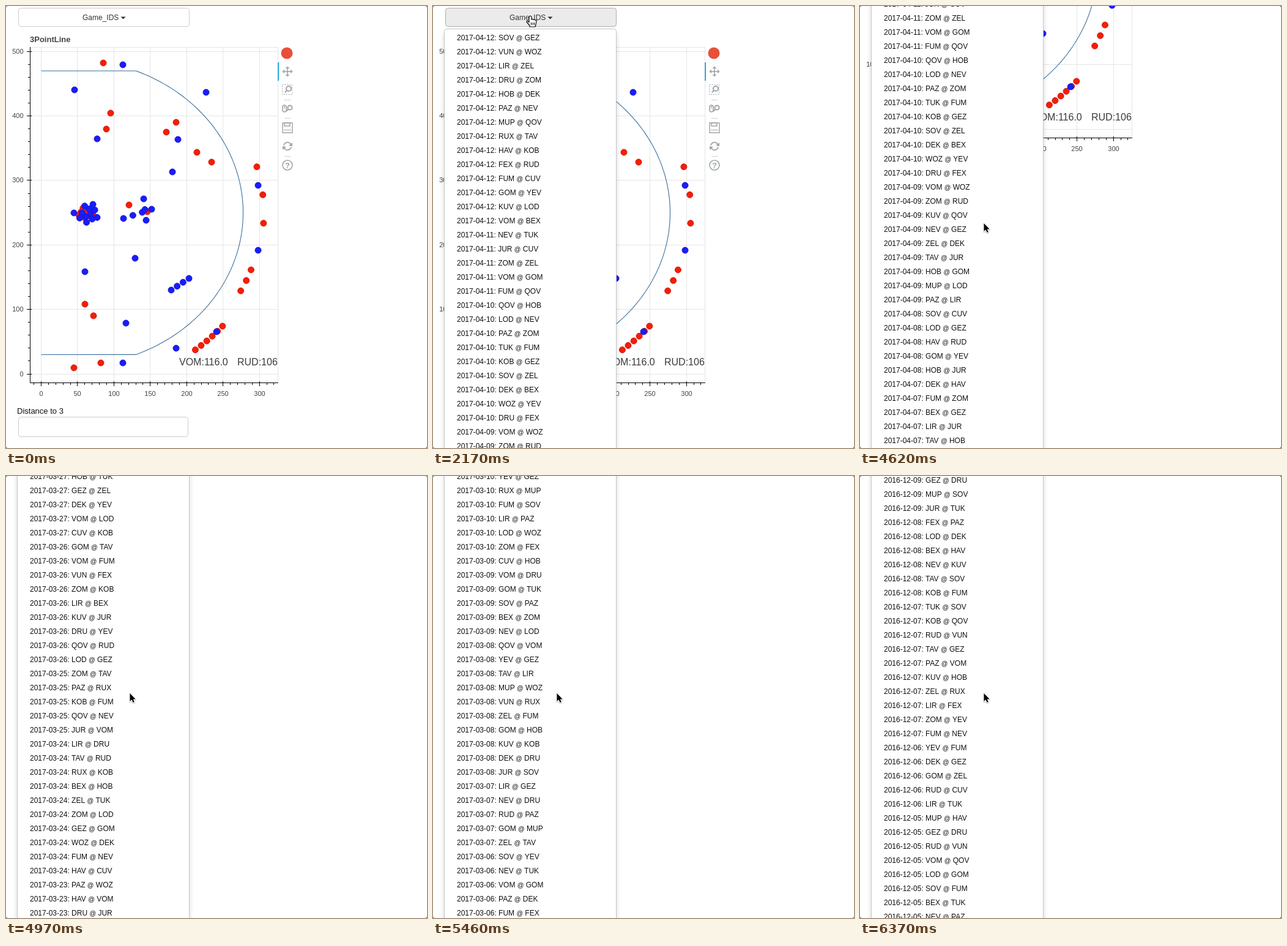
An HTML page with a canvas for the animation above (6.44 s loop, 688 by 722 pixels).

```html
<!DOCTYPE html>
<html lang="en">
<head>
<meta charset="utf-8">
<title>Shot chart</title>
<style>
  html, body { margin: 0; width: 100%; height: 100%; overflow: hidden; background: #fff; }
  canvas { display: block; }
</style>
</head>
<body>
<canvas id="stage" width="688" height="722"></canvas>
<script>
const W = 688, H = 722, LOOP = 6440, STEP = 70, ROW = 23, FIRST_ROW = 52;
const SANS = '"Liberation Sans", Arial, sans-serif';
const INK = '#333', ICON = '#a1a6a9';
const ctx = document.getElementById('stage').getContext('2d');

// ---- Game list ----
const TEAMS = ('VOM RUD ZEL TAV KOB DRU FEX GOM HAV JUR LOD MUP NEV PAZ QOV RUX SOV TUK ' +
  'VUN WOZ YEV BEX CUV DEK FUM GEZ HOB KUV LIR ZOM').split(' ');
const WEEK = [9, 9, 5, 10, 6, 10, 5]; // games per weekday, from Sunday
const FINAL_DAY = 14;

let seed = 20170412;
const random = () => (seed = (seed * 1664525 + 1013904223) >>> 0) / 4294967296;

function shuffled(list) {
  const a = [...list];
  for (let i = a.length - 1; i > 0; i--) {
    const j = Math.floor(random() * (i + 1));
    [a[i], a[j]] = [a[j], a[i]];
  }
  return a;
}

function buildRows() {
  const rows = [], day = new Date(Date.UTC(2017, 3, 12)), end = Date.UTC(2016, 10, 28);
  for (; day > end; day.setUTCDate(day.getUTCDate() - 1)) {
    const date = day.toISOString().slice(0, 10), teams = shuffled(TEAMS);
    const count = rows.length ? WEEK[day.getUTCDay()] : FINAL_DAY;
    for (let i = 0; i < count; i++) rows.push({ date, away: teams[2 * i], home: teams[2 * i + 1] });
  }
  return rows;
}
const rows = buildRows();
const scrollTo = (date, y) => FIRST_ROW + ROW * rows.findIndex(r => r.date === date) - y;

// ---- Motion: keys are [time, values, easing into this key] ----
const linear = u => u;
const easeIn = u => u ** 1.3;
const easeOut = u => 1 - (1 - u) ** 2;
const smooth = u => u * u * (3 - 2 * u);

function track(keys, t) {
  const next = keys.findIndex(k => k[0] > t);
  if (next < 0) return keys[keys.length - 1][1];
  if (next === 0) return keys[0][1];
  const [t0, a] = keys[next - 1], [t1, b, ease = linear] = keys[next];
  const u = ease((t - t0) / (t1 - t0));
  return a.map((v, i) => v + (b[i] - v) * u);
}

const SCROLL = [
  [4340, [0]],
  [4620, [400], smooth],
  [4690, [400]],
  [4970, [scrollTo('2017-03-26', 116)], easeIn],
  [5460, [scrollTo('2017-03-09', 139)], easeOut],
  [5880, [scrollTo('2017-01-14', 105)], easeIn],
  [6370, [scrollTo('2016-12-08', 76)], easeOut]
];
const POINTER = [
  [490, [186, -14]],
  [1050, [159, 16], easeOut],
  [3220, [159, 16]],
  [3570, [158, 21], smooth],
  [3850, [158, 21]],
  [3920, [160.5, 42]],
  [4340, [202.5, 355], smooth]
];
const OPEN_AT = 1890;

// ---- Drawing helpers ----
function text(s, x, y, size, color = INK, align = 'left', weight = 'normal') {
  ctx.font = `${weight} ${size}px ${SANS}`;
  ctx.textAlign = align;
  ctx.fillStyle = color;
  ctx.fillText(s, x, y);
  return x + ctx.measureText(s).width;
}

function line(color, width, ...points) {
  ctx.beginPath();
  points.forEach(([x, y]) => ctx.lineTo(x, y));
  ctx.strokeStyle = color;
  ctx.lineWidth = width;
  ctx.stroke();
}

function fillShape(color, ...points) {
  ctx.beginPath();
  points.forEach(([x, y]) => ctx.lineTo(x, y));
  ctx.fillStyle = color;
  ctx.fill();
}

function box(x, y, w, h, fill, stroke) {
  ctx.beginPath();
  ctx.roundRect(x, y, w, h, 4);
  ctx.fillStyle = fill;
  ctx.fill();
  ctx.strokeStyle = stroke;
  ctx.lineWidth = 1;
  ctx.stroke();
}

function ring(x, y, r, width = 2, from = 0, to = 7) {
  ctx.beginPath();
  ctx.arc(x, y, r, from, to);
  ctx.strokeStyle = ICON;
  ctx.lineWidth = width;
  ctx.stroke();
}

// ---- Shots ----
const ARC = { x: 104.7, y: 337.7, rx: 282.8, ry: 250.6 };
const onArc = (deg, scale = 1) => {
  const a = deg * Math.PI / 180;
  return [ARC.x + ARC.rx * scale * Math.cos(a), ARC.y + ARC.ry * scale * Math.sin(a)];
};
const alongArc = (from, to, count, scale) =>
  Array.from({ length: count }, (_, i) => onArc(from + (to - from) * i / (count - 1), scale));

// Spiral of dots around a spot, flattened vertically.
const cluster = (x, y, rx, ry, count) => Array.from({ length: count }, (_, i) => {
  const r = Math.sqrt((i + 0.5) / count), a = i * 2.4;
  return [x + rx * r * Math.cos(a), y + ry * r * Math.sin(a)];
});
const between = ([x0, y0], [x1, y1], count) => Array.from({ length: count }, (_, i) => {
  const u = i / (count - 1);
  return [x0 + (x1 - x0) * u, y0 + (y1 - y0) * u];
});

const RED = [
  [159, 93],
  ...between([171, 175], [164, 201], 2),
  ...between([278, 190], [262, 206], 2),
  ...between([312, 239], [336, 255], 2),
  ...between([129, 487], [143, 506], 2),
  ...between([155, 583], [111, 591], 2),
  ...between([201, 325], [231, 336], 2),
  ...alongArc(-15.5, 3.5, 3, 1.12),
  ...alongArc(19.6, 27.3, 3, 1.11),
  ...alongArc(40, 51, 6, 1.15),
  ...cluster(131, 338, 13, 10, 10)
];
const BLUE = [
  [191, 96], [112, 137], [327, 141], [149, 217], [281, 218], [272, 271], [412, 293], [412, 399],
  [211, 412], [129, 434], [196, 518], [344, 532], [278, 559], [191, 583], [111, 338],
  ...between([299, 445], [270, 464], 4),
  ...between([192, 347], [238, 332], 4),
  ...between([225, 315], [229, 350], 3),
  ...cluster(135, 340, 17, 18, 11)
];

function drawDots(points, fill, edge) {
  for (const [x, y] of points) {
    ctx.beginPath();
    ctx.arc(x, y, 5, 0, 7);
    ctx.fillStyle = fill;
    ctx.fill();
    ctx.strokeStyle = edge;
    ctx.lineWidth = 1;
    ctx.stroke();
  }
}

// ---- Chart ----
const crisp = v => Math.floor(v) + 0.5;
const px = v => crisp(57.5 + v * 1.189);
const py = v => crisp(601 - v * 1.0535);

function drawAxes() {
  const grid = '#e5e5e5', axis = '#000';
  for (let v = 0; v <= 300; v += 50) {
    line(grid, 1, [px(v), 67], [px(v), 615]);
    text(v, px(v), 637, 11, '#444', 'center');
  }
  for (let v = 0; v <= 500; v += 100) {
    line(grid, 1, [40, py(v)], [444, py(v)]);
    text(v, 28.5, py(v) + 3.5, 11, '#444', 'right');
  }
  ctx.strokeRect(39.5, 67.5, 405, 548);
  line(axis, 1, [39.5, 67], [39.5, 615.5], [445, 615.5]);
  for (let v = -10; v <= 320; v += 10) {
    const major = v % 50 === 0;
    line(axis, 1, [px(v), major ? 613 : 615], [px(v), major ? 621 : 619]);
  }
  for (let v = 0; v <= 500; v += 20) {
    const major = v % 100 === 0;
    line(axis, 1, [major ? 34 : 36, py(v)], [major ? 42 : 40, py(v)]);
  }
}

function drawChart() {
  text('3PointLine', 39, 59, 13, '#444', 'left', 'bold');
  drawAxes();
  ctx.save();
  ctx.beginPath();
  ctx.rect(40, 67, 404, 548);
  ctx.clip();
  line('#3a6f9c', 1.1, [57.5, 106], ...alongArc(-67.6, 67.6, 90), [57.5, 569.5]);
  drawDots(RED, '#f61d07', '#d21c0c');
  drawDots(BLUE, '#1a1cfc', '#1418cc');
  text(`${TEAMS[0]}:116.0`, 283, 587, 16, '#3a3a3a');
  text(`${TEAMS[1]}:106.0`, 378, 587, 16, '#3a3a3a');
  ctx.restore();
}

// ---- Toolbar ----
function drawMagnifier(x, y, r) {
  const d = r * 0.7;
  ring(x, y, r);
  line(ICON, 2, [x - d, y + d], [x - d - 3.5, y + d + 3.5]);
}

function drawMoveIcon(x, y) {
  ctx.save();
  ctx.translate(x, y);
  for (let i = 0; i < 4; i++) {
    line(ICON, 1.6, [0, 0], [7, 0]);
    fillShape(ICON, [8.5, 0], [5, -3.5], [5, 3.5]);
    ctx.rotate(Math.PI / 2);
  }
  ctx.restore();
}

function drawResetIcon(x, y) {
  ctx.save();
  ctx.translate(x, y);
  for (let i = 0; i < 2; i++) {
    ring(0, 0, 6.3, 1.8, -2.9, -0.4);
    fillShape(ICON, [8, -6], [8, 0], [2, -1]);
    ctx.rotate(Math.PI);
  }
  ctx.restore();
}

function drawToolbar() {
  const x = 460;
  ctx.beginPath();
  ctx.arc(459, 77, 9.5, 0, 7);
  ctx.fillStyle = '#e8503a';
  ctx.fill();
  ctx.fillStyle = '#26aae1';
  ctx.fillRect(444, 92, 2, 30);

  drawMoveIcon(x, 107);

  ctx.strokeStyle = ICON;
  ctx.lineWidth = 1;
  ctx.setLineDash([2, 2]);
  ctx.strokeRect(451.5, 128.5, 16, 16);
  ctx.setLineDash([]);
  drawMagnifier(462, 135, 4);

  ctx.beginPath();
  ctx.roundRect(452, 162, 6, 11, 3);
  ctx.lineWidth = 1.6;
  ctx.stroke();
  line(ICON, 1.4, [455, 163], [455, 167]);
  drawMagnifier(464, 166, 3.6);

  ctx.lineWidth = 1.5;
  ctx.strokeRect(452, 191, 16, 16);
  ctx.strokeRect(455, 191, 9, 5);
  line(ICON, 1, [454, 202.5], [466, 202.5]);

  drawResetIcon(x, 229);
  ring(x, 260, 8, 1.6);
  text('?', x, 264.5, 13, ICON, 'center', 'bold');
  for (const y of [153.5, 183.5, 245.5]) line('#d0d0d0', 1, [455, y], [465, y]);
}

// ---- Controls ----
function drawButton(hovered) {
  box(20.5, 3.5, 279, 30, hovered ? '#ebebeb' : '#fff', hovered ? '#adadad' : '#ccc');
  text('Game_IDS', 125, 23, 12);
  fillShape(INK, [187.5, 17.5], [195.5, 17.5], [191.5, 21.5]);
}

function drawInput() {
  text('Distance to 3', 18, 666, 13, '#111');
  box(20.5, 671.5, 277, 32, '#fff', '#ccc');
}

function drawMenu(scroll) {
  const top = Math.max(37.5, scroll - 60), height = H + 160;
  ctx.save();
  ctx.shadowColor = 'rgba(0,0,0,.175)';
  ctx.shadowBlur = 9;
  ctx.shadowOffsetY = 6;
  box(18.5, top, 281, height, '#fff', 'transparent');
  ctx.restore();
  box(18.5, top, 281, height, '#fff', '#c6c6c6');

  const first = Math.max(0, Math.floor((scroll - FIRST_ROW) / ROW) - 1);
  rows.slice(first, first + 36).forEach(({ date, away, home }, i) => {
    const y = FIRST_ROW + ROW * (first + i) + 4;
    let x = text(`${date}: ${away} `, 39, y, 12, '#111');
    x = text('@', x, y, 10.5, '#111');
    text(` ${home}`, x, y, 12, '#111');
  });
}

// ---- Pointer ----
const ARROW = new Path2D('M0 0V13L3 10.3L5.2 15L7.3 14.2L5.2 9.6H9.2Z');
const HAND = new Path2D('M-2 1.5Q0-1 2 1.5V6Q4 4.5 5 6.5Q7 5.2 8 7.2Q10 6.5 10 9L9 14L8 18H-1V16L-6 10Q-6 7-3.5 9L-2 10.5Z');

function drawPointer(x, y, overButton) {
  ctx.save();
  ctx.translate(x, y);
  ctx.lineJoin = 'round';
  if (overButton) {
    ctx.fillStyle = '#fff';
    ctx.strokeStyle = '#000';
    ctx.lineWidth = 1.2;
    ctx.fill(HAND);
    ctx.stroke(HAND);
    for (const fx of [1.5, 4, 6.5]) line('#000', 1, [fx, 11], [fx, 15]);
  } else {
    ctx.shadowColor = 'rgba(0,0,0,.3)';
    ctx.shadowBlur = 2;
    ctx.shadowOffsetY = 1;
    ctx.strokeStyle = '#fff';
    ctx.lineWidth = 2;
    ctx.stroke(ARROW);
    ctx.shadowColor = 'transparent';
    ctx.fillStyle = '#000';
    ctx.fill(ARROW);
  }
  ctx.restore();
}

function drawCorners() {
  ctx.beginPath();
  ctx.rect(0, 0, W, H);
  ctx.roundRect(0, 0, W, H, 3);
  ctx.fillStyle = '#444';
  ctx.fill('evenodd');
}

function draw(t) {
  const scroll = Math.round(track(SCROLL, t)[0]);
  const [x, y] = track(POINTER, t);
  const pointerShown = t >= POINTER[0][0];
  const overButton = pointerShown && y >= 3 && y <= 33;

  ctx.fillStyle = '#fff';
  ctx.fillRect(0, 0, W, H);
  ctx.save();
  ctx.translate(0, -scroll);
  drawButton(overButton);
  drawChart();
  drawToolbar();
  drawInput();
  if (t >= OPEN_AT) drawMenu(scroll);
  ctx.restore();
  if (pointerShown) drawPointer(x, y, overButton);
  drawCorners();
}

const start = performance.now();
function tick() {
  const t = (performance.now() - start) % LOOP;
  draw(Math.floor(t / STEP) * STEP);
  requestAnimationFrame(tick);
}
tick();
</script>
</body>
</html>
```
